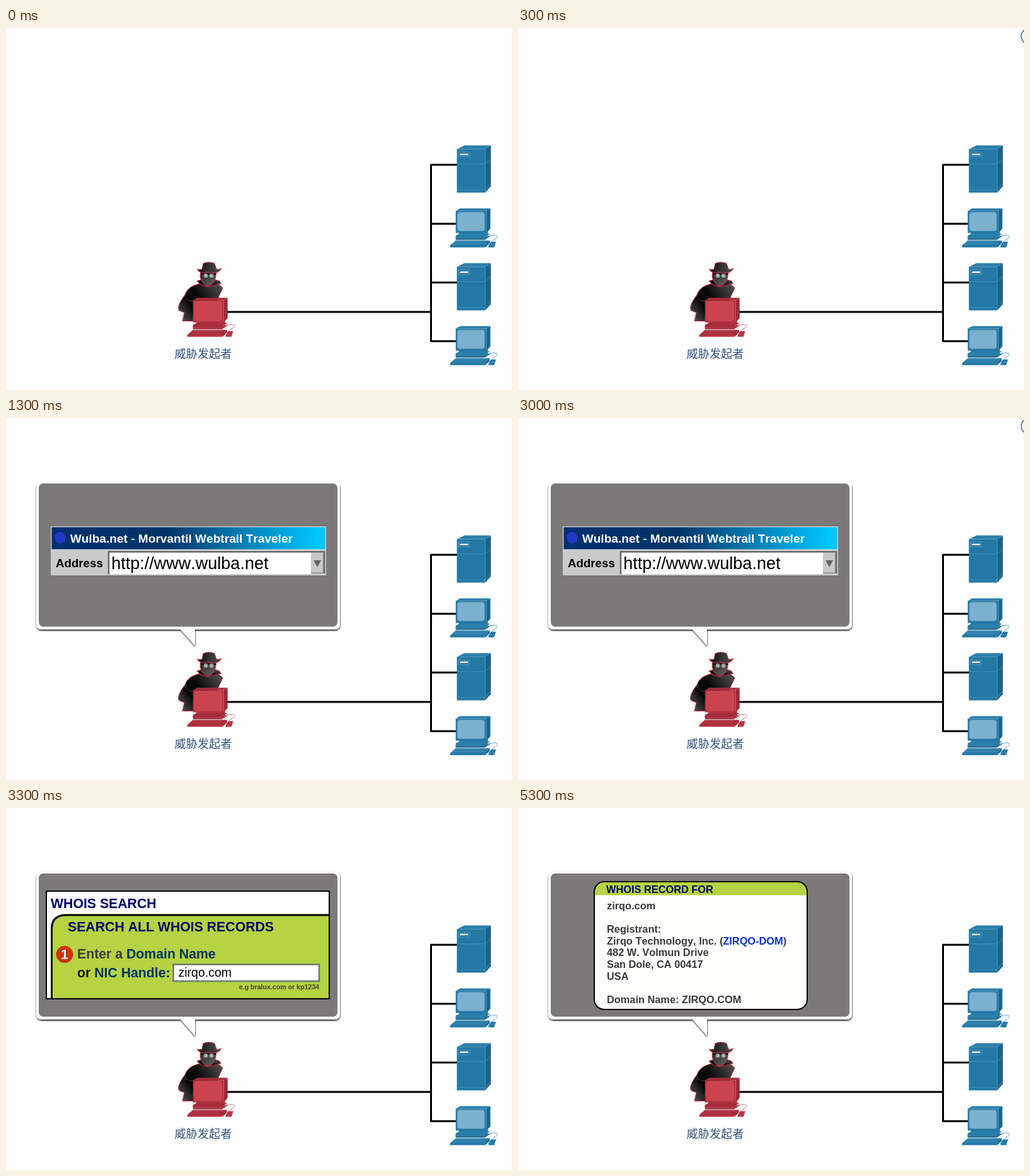
Animation of 803 by 575 pixels, one loop 8400 ms. Source, as an HTML page:

```html
<!DOCTYPE html>
<html lang="zh-CN">
<head>
<meta charset="utf-8">
<title>Domain lookup</title>
<style>
html, body { margin: 0; width: 100%; height: 100%; overflow: hidden; background: #fefefe; }
svg { display: block; width: 100%; height: 100%; }
text { font-family: "Liberation Sans", Arial, sans-serif; font-kerning: none; white-space: pre; }
.b { font-weight: 700; }
.blue { --front: #2378a6; --top: #2b7fac; --side: #1a6388; --screen: #7cb0cf; --edge: #4f95bb; }
.red { --front: #b83242; --top: #a62c3b; --side: #9c2737; --screen: #cc4350; --edge: #cf5762; }
.front { fill: var(--front); }
.top { fill: var(--top); }
.side { fill: var(--side); }
.edge { fill: none; stroke: var(--edge); }
.label { font: 300 18.2px "Noto Sans CJK SC", "Noto Sans CJK", sans-serif; fill: #34507c; }
.search { font-size: 21.25px; fill: #000066; }
.record { font-size: 16.35px; fill: #3b3b3b; }
.hide { visibility: hidden; }
</style>
</head>
<body>
<svg viewBox="0 0 803 575" preserveAspectRatio="none">
  <defs>
    <linearGradient id="title">
      <stop offset="0" stop-color="#003070"/>
      <stop offset=".42" stop-color="#003468"/>
      <stop offset=".97" stop-color="#00c6ff"/>
    </linearGradient>
    <linearGradient id="coat" x1="0" y1=".8" x2="1" y2=".2">
      <stop offset="0" stop-color="#4a4a4a"/>
      <stop offset=".3" stop-color="#050505"/>
      <stop offset=".55" stop-color="#0c0c0c"/>
      <stop offset="1" stop-color="#4c4c4c"/>
    </linearGradient>
    <linearGradient id="skin" x1="0" y1="0" x2="1" y2="1">
      <stop offset="0" stop-color="#222"/>
      <stop offset="1" stop-color="#6a6a6a"/>
    </linearGradient>
    <linearGradient id="felt">
      <stop offset="0" stop-color="#111"/>
      <stop offset="1" stop-color="#505050"/>
    </linearGradient>
    <filter id="shadow" x="-5%" y="-5%" width="110%" height="110%">
      <feDropShadow dx=".3" dy="1.7" stdDeviation=".9" flood-opacity=".95"/>
    </filter>
    <clipPath id="card"><rect x="121" y="117" width="338" height="203" rx="16"/></clipPath>

    <g id="server">
      <path class="top" d="M0 6 12 0H54L45 6Z"/>
      <path class="side" d="M45 6 54 0V65L45 75Z"/>
      <path class="front" d="M0 6H45V75H0Z"/>
      <path class="edge" d="M0 29.5H45L54 21M0 70.5H45L54 60" stroke-width=".8"/>
      <path class="edge" d="M45 6V75" stroke-width=".5"/>
      <rect class="edge" x="2.5" y="10.5" width="18" height="8"/>
      <path d="M5 14.5H18" stroke="#fff" stroke-width="2.4"/>
    </g>

    <g id="pc">
      <path class="side" d="M9 44H64L55 50H9Z"/>
      <path class="front" d="M14 37H60V44H14Z"/>
      <path class="top" d="M9 43 16 40H64L57 44 54 47H9Z"/>
      <path class="edge" d="M9 47.5H55L64 42" stroke-width=".7"/>
      <path class="top" d="M0 59 9 51H63L56 59Z"/>
      <path class="front" d="M0 58.5H56V62H0Z"/>
      <path class="side" d="M56 58.5 63 51V55L56 62Z"/>
      <path class="edge" d="M6 56H52M9 53H56" stroke-width=".5"/>
      <path class="top" d="M9 4 16 0H64L58 4Z"/>
      <path class="side" d="M58 4 64 0V32L58 39Z"/>
      <path class="front" d="M9 4H58V39H9Z"/>
      <rect x="11.5" y="6" width="43.5" height="30" rx="4" fill="var(--screen)" stroke="var(--edge)" stroke-width=".7"/>
      <path d="M63 44C70 41 77 43 75 46S68 49 67 53" fill="none" stroke="var(--front)" stroke-width=".8" stroke-dasharray="4 .7"/>
      <path class="front" d="M61 59 65 53H73L70 62H61Z"/>
      <path class="edge" d="M62 58H70L72 54" stroke-width=".7"/>
    </g>
  </defs>

  <path d="M351 451H674.5M716 217.3H674.5V497.5H716M674.5 311H716M674.5 404.3H716" fill="none" stroke="#000" stroke-width="3" stroke-linejoin="round"/>
  <g class="blue">
    <use href="#server" x="715.5" y="186.4"/>
    <use href="#pc" x="704.7" y="286.5"/>
    <use href="#server" x="715.5" y="373.4"/>
    <use href="#pc" x="704.7" y="473.5"/>
  </g>

  <g id="bubble">
    <path d="M57 101H521Q530 101 530 110V327Q530 336 521 336H300V362L277 336H57Q48 336 48 327V110Q48 101 57 101Z" fill="#fff" filter="url(#shadow)"/>
    <rect x="52" y="104" width="474" height="227.5" rx="7" fill="#7c797a"/>
  </g>

  <g id="browser">
    <rect x="71" y="172" width="437" height="78" fill="#cacaca"/>
    <rect x="72.5" y="173.5" width="434" height="35" fill="url(#title)"/>
    <circle cx="86" cy="190" r="9" fill="#2336c4"/>
    <text class="b" x="101.7" y="198" font-size="19.1" fill="#fff">Wulba.net - Morvantil Webtrail Traveler</text>
    <path d="M73 209.5H506" stroke="#e2e2e2"/>
    <text class="b" x="79" y="236.5" font-size="18.7">Address</text>
    <rect x="163" y="212" width="342" height="36" fill="#fff"/>
    <path d="M163 248V212.5H505V247" fill="none" stroke="#666" stroke-width="2.5"/>
    <text x="167.3" y="239.5" font-size="27">http://www.wulba.net</text>
    <rect x="484" y="214" width="20" height="33" fill="#c8c8c8"/>
    <path d="M484 246.5H504V214" fill="none" stroke="#777" stroke-width="1.5"/>
    <path d="M488 226H500L494 237Z" fill="#666"/>
  </g>

  <g id="search" class="b search">
    <rect x="64" y="132" width="449" height="171" fill="#fefefe"/>
    <path id="form" d="M72.5 302V192Q72.5 170 96 170H512V302Z" fill="#b5d342"/>
    <path d="M72.5 302V192Q72.5 170 96 170H512" fill="none" stroke="#000" stroke-width="3"/>
    <rect x="64" y="132" width="449" height="171" fill="none" stroke="#000" stroke-width="2"/>
    <text x="71" y="159">WHOIS SEARCH</text>
    <text x="98" y="196">SEARCH ALL WHOIS RECORDS</text>
    <circle cx="93" cy="232.5" r="13.5" fill="#cc3300"/>
    <text x="93" y="240" text-anchor="middle" style="fill:#fff">1</text>
    <text x="113" y="239" style="fill:#3c3c3c">Enter a <tspan fill="#003366">Domain Name</tspan></text>
    <text x="113" y="269" style="fill:#111">or <tspan fill="#003366">NIC Handle</tspan>:</text>
    <rect x="265.5" y="248.5" width="231.5" height="26.5" fill="#fff" stroke="#777" stroke-width="2.6"/>
    <text x="273.5" y="268" style="font-size:19.5px;font-weight:400;fill:#000">zirqo.com</text>
    <text x="497" y="287.5" text-anchor="end" style="font-size:10.6px;fill:#44462c">e.g bralux.com or kp1234</text>
  </g>

  <g id="record" class="b record">
    <g clip-path="url(#card)">
      <rect x="121" y="117" width="338" height="203" fill="#fefefc"/>
      <rect x="121" y="117" width="338" height="21.5" fill="#b5d342"/>
    </g>
    <rect x="121" y="117" width="338" height="203" rx="16" fill="none" stroke="#000" stroke-width="2"/>
    <text x="140" y="134.5" style="fill:#000066">WHOIS RECORD FOR</text>
    <text x="141" y="160.5">zirqo.com</text>
    <text x="141" y="197.5">Registrant:</text>
    <text x="141" y="216.5">Zirqo Technology, Inc. (<tspan fill="#0a32c8">ZIRQO-DOM</tspan>)</text>
    <text x="141" y="235">482 W. Volmun Drive</text>
    <text x="141" y="254">San Dole, CA 00417</text>
    <text x="141" y="272.5">USA</text>
    <text x="141" y="310">Domain Name: ZIRQO.COM</text>
  </g>

  <g id="spy" stroke="#d62a3c" stroke-linejoin="round">
    <g fill="url(#coat)">
      <path d="M309 406C296 408 287 414 284 424 276 434 271 445 275 449L283 452 280 465.5H325L337 428 344 413C340 408 335 406 331 404L320 411Z"/>
      <path d="M309 400 303 402 309 408 320 411 332 408 341 406 339 402 333 400Z"/>
    </g>
    <path d="M309 386 308 394C309 402 314 409 320 410 328 409 332 402 333 394L334 386Z" fill="url(#skin)"/>
    <path d="M303 383C306 384 309 384 311 383L313 374Q322 370 331 374L334 383Q338 384 342 382 338 389 330 389 321 386 312 389 306 388 303 383Z" fill="url(#felt)"/>
    <path d="M284 426Q289 436 298 433" fill="none" stroke="#8b7377" stroke-width=".7" stroke-dasharray="2 1"/>
    <g fill="#a9adb0" stroke="#444" stroke-width=".7">
      <path d="M309 391H333" stroke="#000" stroke-width="1.5"/>
      <circle cx="317" cy="393.5" r="3.6"/>
      <circle cx="326" cy="393.5" r="3.6"/>
    </g>
  </g>
  <use class="red" href="#pc" x="287.7" y="428.5"/>
  <text class="label" x="267.5" y="523.5">威胁发起者</text>
  <circle id="ring" cx="810.5" cy="13" r="12" fill="none" stroke="#2a4a80" stroke-width="1.2"/>
</svg>
<script>
const LOOP = 8400;
// Visible spans of each part, in ms
const spans = {
  ring: [[300, 900], [3000, 3300]],
  bubble: [[1300, LOOP]],
  browser: [[1300, 3200]],
  search: [[3200, 5300]],
  record: [[5300, LOOP]]
};
const parts = Object.entries(spans).map(([id, list]) => [document.getElementById(id), list]);
const start = performance.now();

function draw() {
  const t = (performance.now() - start) % LOOP;
  for (const [part, list] of parts) {
    part.classList.toggle("hide", !list.some(([from, to]) => t >= from && t < to));
  }
  requestAnimationFrame(draw);
}
draw();
</script>
</body>
</html>
```
